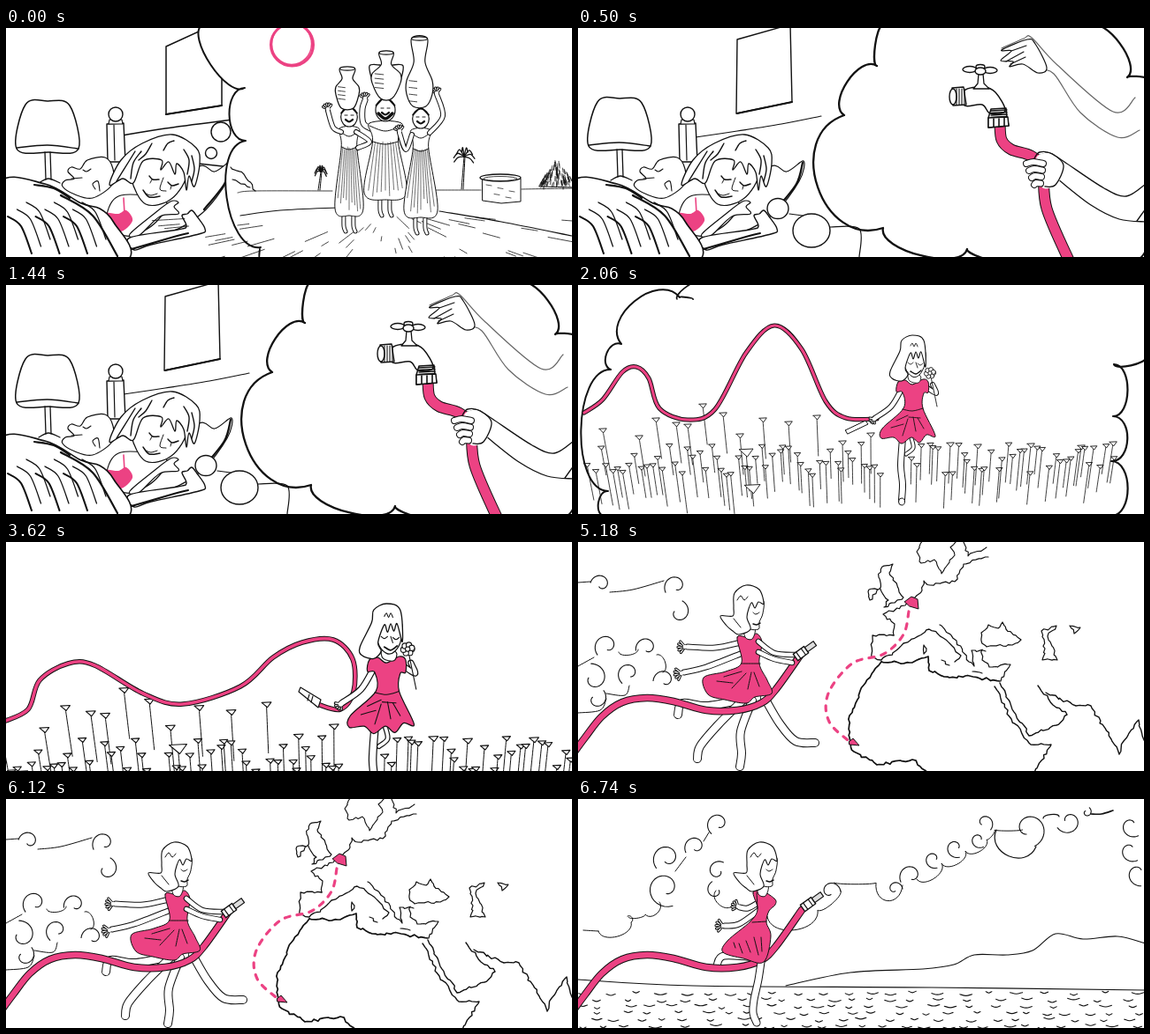
Recreate the animation shown at these times as an HTML page with a canvas. Size 640 by 260 pixels, loop 8000 ms.

```html
<!DOCTYPE html>
<html lang="en">
<head>
<meta charset="utf-8">
<title>Dream of water</title>
<style>
html, body { margin: 0; width: 100%; height: 100%; overflow: hidden; background: #fff; }
canvas { display: block; }
</style>
</head>
<body>
<canvas id="stage" width="640" height="260"></canvas>
<script>
const g = document.getElementById('stage').getContext('2d');
const PINK = '#ec4283', INK = '#111', WHITE = '#fff';
let seed = 1;
const rnd = () => (seed = seed * 16807 % 2147483647) / 2147483647;
const nums = s => s.split(' ').map(Number);

function paint(w, fill, color = INK) {
  if (fill) { g.fillStyle = fill; g.fill(); }
  if (w) { g.lineWidth = w; g.strokeStyle = color; g.stroke(); }
}
// Smooth path through "x y x y ..."
function trace(s, shut) {
  const n = nums(s), k = n.length / 2;
  const at = i => {
    i = shut ? (i + k) % k : Math.max(0, Math.min(k - 1, i));
    return [n[2 * i], n[2 * i + 1]];
  };
  g.beginPath();
  g.moveTo(n[0], n[1]);
  for (let i = 0; i < (shut ? k : k - 1); i++) {
    const [a, b, c, d] = [at(i - 1), at(i), at(i + 1), at(i + 2)];
    g.bezierCurveTo(b[0] + (c[0] - a[0]) / 6, b[1] + (c[1] - a[1]) / 6,
      c[0] - (d[0] - b[0]) / 6, c[1] - (d[1] - b[1]) / 6, c[0], c[1]);
  }
}
function ink(w, s, color) {
  for (const part of s.split('|')) { trace(part); paint(w, null, color); }
}
function blob(fill, w, s) { trace(s, true); paint(w, fill); }
function poly(fill, w, s) {
  const n = nums(s);
  g.beginPath();
  for (let i = 0; i < n.length; i += 2) g.lineTo(n[i], n[i + 1]);
  g.closePath();
  paint(w, fill);
}
function oval(x, y, rx, ry = rx, w = 1.4, fill = WHITE, color = INK) {
  g.beginPath();
  g.ellipse(x, y, rx, ry, 0, 0, 7);
  paint(w, fill, color);
}
function tube(w, s, fill = WHITE) {
  trace(s);
  paint(w + 2);
  paint(w, null, fill);
}
// Open hand: fingers fanned about an angle
function hand(x, y, a, r = 6) {
  for (let i = -2; i < 3; i++) {
    const t = a + i * .45;
    tube(1.2, `${x} ${y} ${x + r * Math.cos(t)} ${y + r * Math.sin(t)}`);
  }
  oval(x, y, 2.2, 2.2, 0);
}
// Bulging edge; each joint is "x y bulge"
function puffs(w, s, fill) {
  const n = nums(s);
  g.beginPath();
  g.moveTo(n[0], n[1]);
  for (let i = 0; i + 4 < n.length; i += 3) {
    const [x, y, k, X, Y] = n.slice(i, i + 5), nx = (Y - y) * k, ny = (x - X) * k;
    g.bezierCurveTo(x + nx, y + ny, X + nx, Y + ny, X, Y);
  }
  if (fill) { g.lineTo(640, 260); g.lineTo(640, 0); paint(0, fill); }
  else paint(w);
}
// Curls; each is "x y r angle turn"
function curls(s) {
  for (const part of s.split('|')) {
    const [x, y, r, a, turn] = nums(part);
    g.beginPath();
    for (let i = 0; i <= 30; i++) {
      const q = r * (1 - .7 * i / 30), t = a + turn * i / 30;
      g.lineTo(x + q * Math.cos(t), y + q * Math.sin(t));
    }
    paint(1.1);
  }
}
// Straight strokes spread from one edge to another
function pleats(a, b, y, c, d, Y, n) {
  for (let i = 1; i < n; i++) {
    const t = i / n;
    ink(.6, `${a + (b - a) * t} ${y + rnd() * 3} ${c + (d - c) * t} ${Y - rnd() * (Y - y) * .25}`);
  }
}
// Wobbly shoreline
function coast(w, s) {
  for (const part of s.split('|')) {
    const n = nums(part);
    g.beginPath();
    g.moveTo(n[0], n[1]);
    for (let i = 2; i < n.length; i += 2) {
      const dx = n[i] - n[i - 2], dy = n[i + 1] - n[i - 1], m = Math.ceil(Math.hypot(dx, dy) / 4);
      for (let j = 1; j <= m; j++) {
        const e = j < m ? 3 : 0;
        g.lineTo(n[i - 2] + dx * j / m + (rnd() - .5) * e, n[i - 1] + dy * j / m + (rnd() - .5) * e);
      }
    }
    paint(w);
  }
}

function bedroom(later) {
  if (later) {
    poly(WHITE, 1.4, '180 13 240 -4 242 84 179 97');
    ink(2, '180 97 242 84');
    ink(1.2, '133 124 180 117 230 109 275 100|285 226 318 228 318 260');
  } else {
    poly(WHITE, 1.5, '181 21 244 -8 244 88 181 98');
    ink(2, '181 98 244 88');
    ink(1.4, '131 122 180 114 256 104|131 122 133 150|218 154 254 158');
  }
  g.save();
  if (later) g.translate(0, -3);
  blob(WHITE, 1.5, '22 87 47 83 72 88 82 137 48 141 12 137');
  ink(1.3, '12 136 47 133 82 137|44 141 45 172|50 141 51 172|37 176 48 171 61 176');
  g.restore();
  poly(WHITE, 1.4, '114 109 133 108 135 152 115 152');
  ink(1.2, '122 110 123 150');
  poly(WHITE, 1.2, '117 104 131 104 132 109 116 109');
  oval(124, 98, 8);
  blob(WHITE, 1.2, '212 161 236 163 255 151 250 174 222 210 185 232 142 238');
  ink(2.3, '254 153 247 177 224 206');

  // sleeping man
  blob(WHITE, 1.2, '64 180 67 173 77 171 70 163 74 158 84 160 92 150 112 147 121 160 120 178 98 193 78 189');
  ink(1.1, '87 161 91 163 96 160|74 171 86 170|101 183 98 177 104 174 106 185');
  // sleeping woman
  blob(WHITE, 1.2, '130 190 114 212 122 229 142 236 170 220 180 196');
  blob(PINK, 0, '113 211 127 211 136 207 143 219 128 231');
  ink(1.6, '133 193 134 211', PINK);
  blob(WHITE, 1.2, '147 150 142 172 158 200 187 194 204 165 180 146');
  blob(WHITE, 1.3, '117 178 130 150 154 131 188 121 215 136 219 154 213 180 207 168 204 184 201 164 193 154 191 166 184 152 175 161 176 150 155 151 144 176 132 171');
  ink(1.4, '146 140 138 153 125 174|153 140 144 153 141 171|165 131 158 143 150 150|178 139 183 131 190 128|201 138 207 150 205 166|210 145 213 160 210 174');
  ink(1.5, '162 168 166 172 173 172|183 175 188 179 195 177|155 184 162 192 174 191');
  ink(1, '178 170 174 183 181 185|165 172 163 176|187 179 186 183|158 188 164 190 171 188');
  blob(WHITE, 1.2, '140 234 166 212 186 197 195 198 190 203 195 211 174 214 150 236');
  blob(WHITE, 1.4, '140 238 194 229 204 225 199 213 205 211 210 207 216 214 225 228 218 234 164 246 145 252');
  ink(2, '142 251 190 237 206 233');
  // blanket
  blob(WHITE, 1.6, '-9 178 44 177 85 199 106 205 122 221 139 262 60 290 -9 280');
  for (let i = 0; i < 9; i++) {
    const x = 2 + i * 10.5, y = 214 - (i % 3) * 8;
    ink(i % 3 ? 1.3 : 2.1, `${x} ${y} ${x + 15} ${y + 11} ${x + 27} ${y + 42}`);
  }
  ink(2.2, '32 178 54 182 72 193|62 190 98 213 126 259');
}

const point = (x, y) => [x, y].join(' ');
// Jar mirrored about its axis: centre, top, neck, belly, height
function jar(x, y, n, b, h, low = .55) {
  const side = [[n, 0], [n * .7, h * low * .55], [b, h * low], [b, h * (low + .2)], [n * .8, h]];
  const left = side.map(([d, q]) => point(x - d, y + q));
  blob(WHITE, 1.2, side.reverse().map(([d, q]) => point(x + d, y + q)).concat(left.reverse().reverse()).join(' '));
  oval(x, y, n, 2.2, 1.2);
  for (let i = 0; i < 4; i++) ink(.8, `${x - b * .8} ${y + h * (low + i * .1)} ${x - b * .2} ${y + h * (low + i * .1) + 1}`);
}
// Woman with a jar: centre, shoulder, hem and their half widths
function carrier(x, y, w, hem, W, r) {
  const waist = y + 21, foot = hem + 18;
  for (const d of [-6, 5]) tube(3, `${x + d} ${hem - 5} ${x + d} ${foot - 6} ${x + d + 2} ${foot}`);
  blob(WHITE, 1, `${x - w} ${y} ${x + w} ${y} ${x + w * .8} ${waist} ${x + W} ${hem - 8} ${x} ${hem} ${x - W} ${hem - 8} ${x - w * .8} ${waist}`);
  pleats(x - w * .8, x + w * .8, waist, x - W, x + W, hem - 4, 10);
  ink(1, `${x - w} ${y + 3} ${x} ${y + 9} ${x + w} ${y + 3}|${x - w * .8} ${waist} ${x} ${waist + 3} ${x + w * .8} ${waist}`);
  const h = y - r - 2;
  oval(x, h, r * .85, r, 1.2);
  ink(2, `${x - r * .8} ${h - r * .4} ${x} ${h - r * 1.1} ${x + r * .8} ${h - r * .4}`);
  ink(2.2, `${x - 4} ${h + 3} ${x} ${h + 5.5} ${x + 4} ${h + 3}`);
  ink(1, `${x - 5} ${h - 2} ${x - 2} ${h - 2}|${x + 2} ${h - 2} ${x + 5} ${h - 2}`);
}
function palm(x, y, r, foot) {
  ink(1, `${x} ${y} ${x - 3} ${foot}|${x + 1} ${y} ${x - 1} ${foot}`);
  for (let i = 0; i < 8; i++) {
    const a = i * .57 - 3.5, dx = r * Math.cos(a), dy = r * .7 * Math.sin(a);
    ink(1.3, `${x} ${y} ${x + dx * .6} ${y + dy - 2} ${x + dx} ${y + dy + 3}`);
  }
}

function village() {
  bedroom(false);
  const edge = '222 -4 -.27 270 68 -.4 271 128 -.33 288 249 -.1 287 262';
  puffs(0, edge, WHITE);
  puffs(2, edge);
  oval(243, 118, 11);
  oval(232, 142, 6.5);
  oval(323.5, 19, 24, 24, 3, null, PINK);
  oval(323, 18, 22.5, 23.5, 1.5, null, PINK);
  ink(.8, '262 187 281 185 369 185|486 184 537 184|583 183 640 182');
  coast(1.2, '254 158 269 166 282 185|256 172 276 181');
  ink(1.2, '265 213 310 207 374 204|490 208 560 220 640 236');
  for (let i = 0; i < 60; i++) {
    const a = .1 + 2.95 * (i * .618 % 1), d = 20 + rnd() * 130, n = 8 + rnd() * 16;
    const c = Math.cos(a) * 1.6, s = Math.sin(a) * .6, x = 430 + c * d, y = 203 + s * d;
    if (y > 212) ink(.8, `${x} ${y} ${x + c * n} ${y + s * n}`);
  }
  palm(356, 163, 7, 184);
  palm(518, 146, 12, 183);
  poly(WHITE, 1, '538 171 582 171 582 197 560 199 539 196');
  oval(559, 170, 23, 4);
  oval(559, 171, 19, 2.5, .8);
  for (let i = 0; i < 5; i++) ink(.7, `${543 + i * 13 % 30} ${178 + i * 3.5} ${549 + i * 13 % 30} ${179 + i * 3.5}`);
  for (let i = 0; i < 110; i++) {
    const t = Math.sqrt(rnd()), x = 623 + (rnd() * 40 - 20) * t, y = 150 + 29 * t;
    ink(.8, `${x} ${y - 3} ${x + (x - 623) * .15} ${y + 2}`);
  }
  ink(1, '605 180 642 181|608 180 608 183|630 180 630 183');

  tube(5, '412 114 404 108 403 92 406 82');
  hand(406, 80, -1.7);
  carrier(429, 108, 18, 195, 24, 13);
  ink(3.5, '421 97 429 103 437 97');
  ink(1.3, '423 42 411 43 414 60|437 42 449 43 446 61');
  jar(430, 28, 8, 16, 52, .46);
  carrier(388, 114, 11, 213, 16, 11);
  tube(4, '379 118 370 113 364 94');
  hand(364, 92, -1.8);
  tube(4, '396 118 411 129 398 136');
  jar(386, 46, 8.5, 13, 45, .46);
  carrier(469, 116, 11, 215, 19, 11);
  tube(4, '479 119 494 100 487 75');
  hand(487, 74, -1.8);
  tube(4, '459 121 452 138 445 119');
  hand(445, 117, -1.8);
  jar(467.5, 12, 9, 14.5, 77, .62);
}

function tap() {
  bedroom(true);
  puffs(2.3, '344 -2 -.15 338 43 -.36 301 99 -.54 345 227 -.27 440 251 -.15 470 262');
  puffs(2.3, '642 57 -.1 621 56 -.3 578 -2');
  puffs(2, '642 233 .3 631 262');
  oval(226, 205, 12, 11.5);
  oval(264, 230, 21, 19);
  ink(1.2, '239 211 254 213');
  tube(11, '477 108 479 127 490 138 512 145 525 160 530 205 557 268', PINK);
  blob(WHITE, 1.5, '437 71 458 67 472 73 483 94 466 97 457 87 437 88');
  poly(WHITE, 1.4, '423 68 436 67 439 87 424 88');
  oval(424, 78, 4, 9);
  for (let i = 0; i < 4; i++) {
    ink(1.1, `${428 + i * 3} 69 ${428 + i * 3} 87`);
    ink(1.3, `467 ${94 + i * 2.5} 485 ${93 + i * 2.5}`);
  }
  poly(WHITE, 1.3, '447 69 452 63 453 52 458 52 459 63 465 69');
  for (const [x, y] of [[443, 47], [466, 48]]) oval(x, y, 8, 3.5);
  oval(455, 44, 5, 2.5);
  oval(455, 49, 6, 4);
  poly(null, 1.5, '467 92 484 91 485 101 487 111 464 113 464 102');
  poly(WHITE, 1.5, '464 102 486 101 487 111 464 113');
  ink(1.6, '470 103 470 112|476 103 476 112|482 102 482 111');
  poly(WHITE, 0, '530 144 550 152 595 182 640 180 640 219 612 217 543 172');
  ink(1.3, '523 144 534 142 550 152 595 182 620 191 642 177|543 172 580 201 612 217 642 220|642 205 632 219');
  blob(WHITE, 0, '518 148 536 143 550 160 540 178 524 180');
  ink(1.3, '516 148 522 141 536 143 549 156 540 178 528 180');
  for (let i = 0; i < 4; i++) tube(6, `${507 + i * 3} ${154 + i * 8} ${515 + i} ${152 + i * 8} ${526 - i} ${154 + i * 7.5}`);
  ink(1.2, '479 23 504 12 513 11 542 42 605 95 630 79|520 49 538 52 568 96 610 124 635 116', '#666');
  blob(WHITE, 1.2, '478 37 490 26 479 25 508 13 517 18 530 45 520 51 503 41 488 44 492 38');
  ink(1.1, '489 41 506 33|484 38 504 27|490 26 507 20');
}

function flower(x, y, r, len) {
  const lean = len * (.2 - x / 1700);
  ink(.8, `${x} ${y} ${x + lean} ${y + len}`);
  poly(WHITE, .9, `${x - r} ${y - r * .4} ${x + r} ${y - r * .5} ${x + r * .2} ${y + r * .6}`);
}
function meadow() {
  const tall = nums('28 165 88 153 141 137 111 158 124 160 69 173 164 147 183 171 209 153 238 157 270 150 299 179 331 170 421 181 452 183 512 182 569 184 605 180');
  for (let i = 0; i < tall.length; i += 2) flower(tall[i], tall[i + 1], 4.3, 44);
  for (let i = 0; i < 92; i++) {
    const x = 10 + i * 6.5 + rnd() * 5;
    if (x < 352 || x > 376) flower(x, 180 + rnd() * 36, 3.7, 28 + rnd() * 18);
  }
  flower(190, 190, 8, 44);
  flower(197, 231, 9, 20);
}
function dancer() {
  tube(3, '377 174 379 185 371 192');
  tube(6, '367 174 365 205 367 226 366 244');
  oval(366, 246, 3.5, 4, 1);
  tube(4.5, '366 118 354 138 336 151');
  hand(335, 152, 2.4, 5);
  tube(4, '394 116 405 123 401 113');
  blob(PINK, 1, '362 110 370 108 378 113 390 107 396 110 396 122 391 123 390 140 404 171 394 170 386 179 377 173 366 180 357 173 343 174 344 163 368 140 367 122 360 121');
  ink(.9, '367 141 378 143 390 140|360 154 373 148|354 162 368 158|367 171 373 152|382 166 379 150|391 163 384 151|374 150 387 151');
  blob(WHITE, .9, '374 101 375 109 385 111 387 103');
  blob(WHITE, 1, '368 76 370 94 378 104 386 102 392 90 391 74');
  blob(WHITE, 1.1, '353 98 364 75 366 63 378 57 391 63 393 93 388 76 385 83 382 76 379 84 376 77 370 94 373 102 366 109 355 106');
  ink(.9, '376 69 378 66 380 70 382 66 384 70|373 88 376 90 379 88|384 89 387 91 390 89|382 88 384 94');
  ink(1.5, '376 98 382 101 388 97');
  ink(.9, '399 104 406 138');
  for (let i = 0; i < 7; i++) oval(398 + 4 * Math.cos(i), 100 + 4 * Math.sin(i), 2.6, 2.6, .9);
  oval(398, 100, 2.2, 2.2, .9);
}
function zoomed(x, y, k, draw) {
  g.save();
  g.translate(x, y);
  g.scale(k, k);
  draw();
  g.restore();
}
function field() {
  meadow();
  puffs(1.6, '134 -2 -.2 112 16');
  puffs(2, '130 16 -.1 115 14 -.45 49 67 -.48 37 96 -.31 34 234 -.4 29 262');
  puffs(2.2, '642 82 .2 606 90 .36 605 149 .45 603 200 .4 603 262');
  tube(3.2, '7 145 28 130 50 99 66 93 80 106 92 140 124 153 155 141 190 77 222 46 253 73 280 132 303 151 338 152', PINK);
  poly(WHITE, 1, '302 165 325 154 328 158 305 169');
  dancer();
}
function closer() {
  zoomed(-43, -3, 1.25, meadow);
  tube(3.6, '-3 204 25 190 38 157 70 138 100 140 155 172 200 184 265 164 302 131 335 114 370 111 392 133 393 170 378 190 352 184', PINK);
  poly(WHITE, 1.2, '333 165 356 179 353 188 331 170');
  ink(1.1, '343 173 341 180|347 175 345 182');
  zoomed(-23.4, 1.6, 1.2, dancer);
}

const hose = () => tube(6.5, '-6 241 8 222 27 198 50 182 78 177 108 181 145 191 180 191 207 183 224 167 253 126', PINK);
function nozzle(x, y) {
  g.save();
  g.translate(x, y);
  g.rotate(-.63);
  poly(WHITE, 1.4, '0 -4.5 15 -4.5 15 4.5 0 4.5');
  poly('#ddd', 1.2, '15 -3 27 -3 27 3 15 3');
  ink(1.2, '4 -4 4 4|11 -4 11 4');
  g.restore();
}
function profile() {
  blob(WHITE, 1, '188 94 189 108 197 110 200 98');
  blob(WHITE, 1, '192 70 192 96 204 99 205 91 209 81 209 66');
  blob(WHITE, 1.1, '176 74 177 58 190 49 205 54 210 70 204 68 200 75 196 69 191 85 195 99 182 105 175 101 168 95 161 84 175 84');
  ink(1, '180 66 184 61 188 66 192 62|198 80 201 82 205 80|176 87 184 97');
  ink(1.5, '198 93 202 94 206 92');
}

function journey() {
  ink(1, '0 46 14 45|36 57 62 54 97 44|0 141 18 131|0 194 25 191 32 178|32 172 53 174 58 163');
  puffs(1, '46 125 -.3 68 122|'.slice(0, -1));
  puffs(1, '89 128 .4 96 148');
  curls('26 48 12 3.3 5.2|111 50 14 2.6 5.2|113 80 14 -1.2 4.6|33 118 15 2.4 5.4|78 120 13 2.9 5.2');
  curls('17 155 17 -1.7 5|58 149 14 2.2 5.3|98 157 13 3.1 5|20 178 13 -.8 4.4');
  // trailing limbs
  tube(5, '184 114 155 120 124 119');
  hand(121, 119, 3.1, 8);
  tube(5, '186 126 145 142 120 148');
  hand(117, 149, 2.9, 8);
  tube(8, '182 180 145 186 118 183 113 196');
  tube(8, '186 180 158 208 138 232 135 246');
  tube(8, '197 180 184 215 185 240 183 255');
  tube(8, '211 177 228 206 246 226 268 228');
  hose();
  blob(PINK, 1, '180 108 194 109 202 104 208 114 205 138 214 157 219 172 200 176 190 183 166 179 147 173 142 154 167 147 185 137');
  ink(1, '185 138 206 138|165 153 185 147|174 166 190 149|192 167 196 148|205 164 199 148|157 158 175 160');
  tube(4.5, '204 113 222 126 246 128');
  tube(4.5, '204 125 222 133 242 137');
  profile();
  nozzle(246, 131);

  coast(1.7, '343 136 375 137 396 130 397 146 420 154 438 152 477 158');
  coast(1.7, '343 136 325 160 307 197 307 222 312 238 338 253 378 247 396 262');
  coast(1.4, '471 164 490 201 512 230 535 230 516 262|477 160 491 190 510 220 541 208 553 196 537 185 520 163');
  coast(1.4, '529 171 563 186 580 186 603 224 612 241 617 226 634 202 641 233');
  coast(1.3, '357 106 333 106 332 131 343 134 360 123 368 115 397 99 413 109 433 129 426 136');
  coast(1.2, '409 94 428 112 442 136 448 141 445 123 461 124|357 106 358 93 345 82 370 72 389 55 391 44 398 49 426 45 436 25 464 17');
  coast(1.1, '390 -2 383 11 388 24 403 20 411 36 426 15 421 6 429 -2|436 -2 441 16 462 6');
  coast(1.2, '346 74 351 66 343 56 340 40 344 28 356 25 352 35 368 63 346 74|330 66 329 54 341 53 330 66|391 117 394 121 391 127 391 117|411 134 420 140|446 147 457 149');
  coast(1.2, '456 112 456 103 464 94 475 98 480 91 484 99 501 111 491 117 462 119 456 112|457 122 457 134 465 142 489 139 478 158');
  coast(1.2, '524 101 541 95 531 107 542 134 525 134 528 121 524 101|556 95 568 97 561 104 556 95');
  poly(PINK, 1, '369 68 377 62 384 65 385 76 375 73');
  poly(PINK, 1, '306 227 311 223 318 231 307 230');
  g.setLineDash([6, 8]);
  ink(3.2, '374 79 368 105 346 127 310 138 283 172 284 204 310 229', PINK);
  g.setLineDash([]);
}

function shore() {
  ink(1, '6 149 23 150|110 82 122 66|142 48 148 38');
  puffs(1, '23 150 -.4 60 140 -.6 56 133');
  puffs(1, '57 134 -.2 76 131 -.5 92 117');
  puffs(1, '156 104 -.5 175 121');
  curls('99 101 22 1.2 6.5|101 67 17 2.4 6|133 54 13 2.6 5.6|159 28 14 2.2 5.6|158 82 12 -1 -5.2|156 104 11 4.3 -4.4');
  puffs(1, '214 133 -.45 271 126 -.2 297 104');
  puffs(1, '289 95 -.05 337 95 -.85 367 98');
  puffs(1, '383 91 -.4 411 73 -.4 438 59 -.4 462 46 -.2 471 35 -.05 503 35');
  curls('285 105 12 0 -5|358 102 9 0 -5|377 87 14 2.6 5.2|402 68 11 1.2 5.2|427 55 12 1.2 5.2|453 46 10 1 5.2');
  puffs(1.2, '473 35 -.6 518 54');
  puffs(1.2, '526 22 .25 544 20');
  curls('459 27 11 .8 -4.6|509 34 21 1.2 -5.6|555 25 15 2.6 -5.6|575 15 6 -1 5|626 30 14 1 4.4|625 58 14 1 4.2|634 84 15 1.4 4');
  ink(1.6, '580 17 592 17 605 13');
  ink(1.1, '235 212 308 197 390 193 425 188 448 177 485 177 514 172 540 153 571 159 610 156 642 164|0 205 130 212 400 214 642 217');
  for (let r = 0; r < 6; r++) {
    for (let x = rnd() * 20; x < 640; x += 18 + rnd() * 19) {
      const y = 218 + r * 7.5 + rnd() * 4, w = 3 + rnd() * 4;
      ink(1.1, `${x} ${y} ${x + w} ${y + 1.6} ${x + 2 * w} ${y}`);
    }
  }
  tube(5, '205 117 192 124 183 123');
  hand(181, 122, 3.5, 7);
  tube(5, '205 126 182 142 166 144');
  hand(164, 144, 3.2, 8);
  tube(7, '203 180 165 178 157 189');
  hose();
  tube(7, '208 178 204 205 199 228 198 243 202 254');
  blob(PINK, 1, '198 107 204 102 222 113 223 120 216 127 213 140 218 156 210 185 187 181 164 174 169 161 195 139 203 125');
  ink(1, '182 164 186 175|190 161 195 174|199 157 204 177|176 163 178 169|207 157 208 173|197 140 213 139|202 106 203 124');
  zoomed(15, 0, 1, profile);
  nozzle(254, 124);
}

const SCENES = [[0, village], [500, tap], [2060, field], [3620, closer], [5180, journey], [6740, shore]];
const start = performance.now();
let shown;
function frame() {
  const t = (performance.now() - start) % 8000;
  const draw = SCENES.filter(s => t >= s[0]).pop()[1];
  if (draw !== shown) {
    shown = draw;
    seed = 4711;
    g.fillStyle = WHITE;
    g.fillRect(0, 0, 640, 260);
    g.lineCap = g.lineJoin = 'round';
    draw();
  }
  requestAnimationFrame(frame);
}
frame();
</script>
</body>
</html>
```
